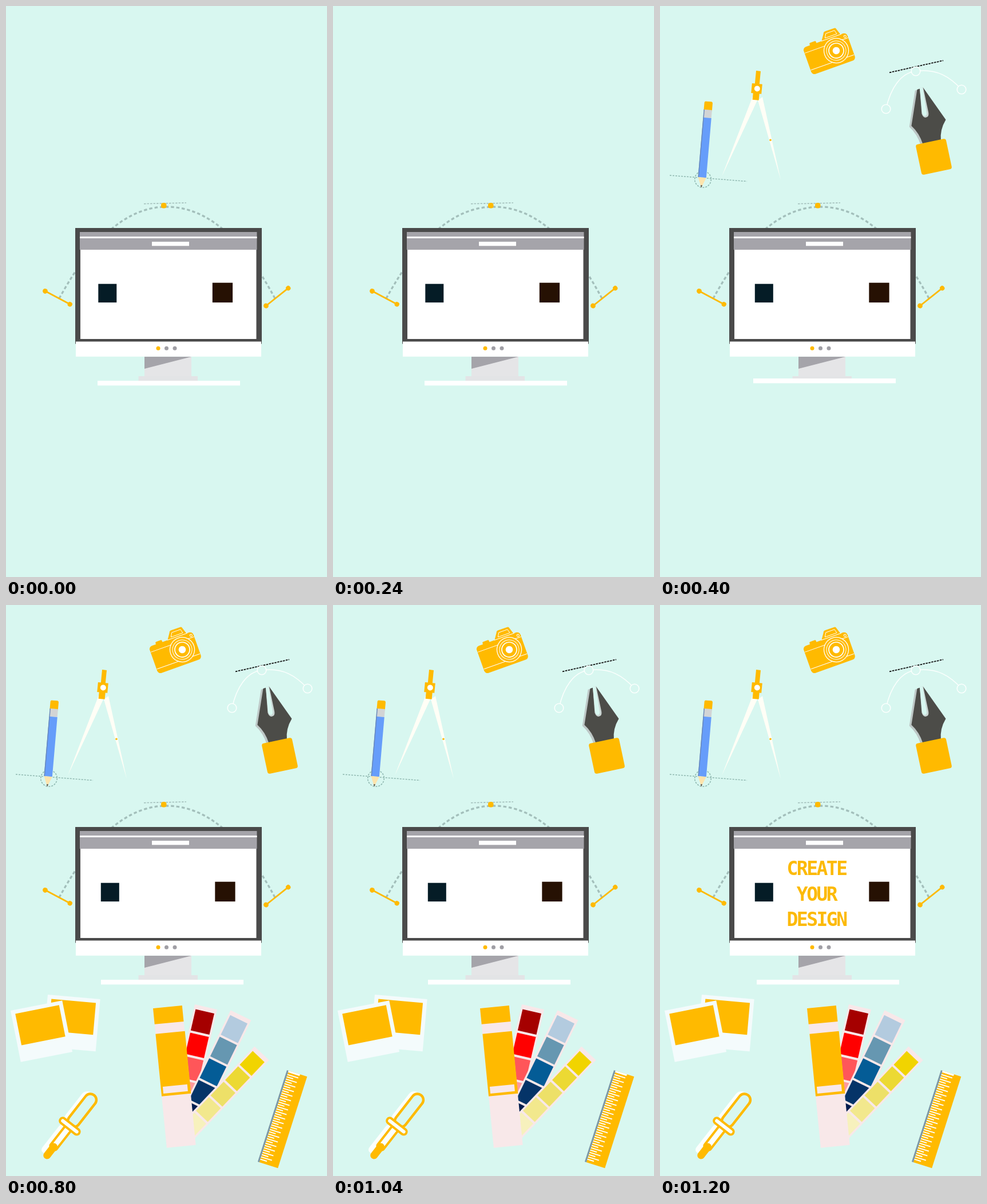
These frames come from a looping animation (561 px wide and 998 px high, 1.6 s). An HTML page with a canvas:

```html
<!DOCTYPE html>
<html lang="en">
<head>
<meta charset="utf-8">
<title>Design desk</title>
<style>
html, body { margin: 0; width: 100%; height: 100%; overflow: hidden; background: #d8f7f0; }
canvas { display: block; width: 100vw; height: 100vh; }
</style>
</head>
<body>
<canvas id="stage" width="561" height="998"></canvas>
<script>
const ctx = document.getElementById("stage").getContext("2d");
const MINT = "#d8f7f0", GOLD = "#ffba00", GREY = "#a5a4aa", DARK = "#4c4c48";
const SAGE = "#a3bfbb", WHITE = "#fff", BLUSH = "#f8e8e9";
const STEP = 400;

function rect(x, y, w, h, color) {
  ctx.fillStyle = color;
  ctx.fillRect(x, y, w, h);
}

function shape(path, color) {
  ctx.fillStyle = color;
  ctx.fill(new Path2D(path));
}

function line(path, color, width, dash = []) {
  ctx.strokeStyle = color;
  ctx.lineWidth = width;
  ctx.setLineDash(dash);
  ctx.stroke(new Path2D(path));
  ctx.setLineDash([]);
}

function circle(x, y, r, fill, stroke, width = 1, dash = []) {
  ctx.beginPath();
  ctx.arc(x, y, r, 0, Math.PI * 2);
  if (fill) { ctx.fillStyle = fill; ctx.fill(); }
  if (stroke) {
    ctx.strokeStyle = stroke;
    ctx.lineWidth = width;
    ctx.setLineDash(dash);
    ctx.stroke();
    ctx.setLineDash([]);
  }
}

function pill(x, y, w, h, r, fill, stroke, width) {
  ctx.beginPath();
  ctx.roundRect(x, y, w, h, r);
  if (fill) { ctx.fillStyle = fill; ctx.fill(); }
  if (stroke) { ctx.strokeStyle = stroke; ctx.lineWidth = width; ctx.stroke(); }
}

function placed(x, y, degrees, draw) {
  ctx.save();
  ctx.translate(x, y);
  ctx.rotate(degrees * Math.PI / 180);
  draw();
  ctx.restore();
}

function handle(x, y, degrees, length) {
  placed(x, y, degrees, () => {
    rect(0, -1.4, length, 2.8, GOLD);
    circle(0, 0, 4.4, GOLD);
    circle(length, 0, 4.1, GOLD);
  });
}

function guides() {
  line("M93 511C130 445 190 351 281 351C370 351 432 440 470 511", SAGE, 3.3, [5.5, 4]);
  line("M241 345.7L315 344", SAGE, 1.6, [3.5, 2]);
  pill(271, 344, 9.5, 9.5, 4, GOLD);
  handle(68.5, 498.3, 28, 49);
  handle(454.5, 524, -38.5, 49.5);
}

function monitor(step) {
  rect(242, 613, 82, 35, "#e5e5e7");
  shape("M242 613H324L242 634Z", GREY);
  rect(231.5, 647, 103.5, 8, "#e3e4e6");
  // The base plate slides right and lifts briefly.
  rect(160 + step * 3, step === 1 ? 651 : 655, 249, 8.3, WHITE);

  rect(121, 388, 326, 202.5, "#4a4a4a");
  rect(129, 395, 309.5, 31, GREY);
  rect(129, 403, 309.5, 3, WHITE);
  rect(255, 412, 65, 7.3, WHITE);
  rect(130, 426, 307.5, 156, WHITE);
  rect(122, 586.5, 324, 26.3, WHITE);
  for (let i = 0; i < 3; i++) circle(266 + i * 14.5, 598.3, 3.5, i ? "#a09fa5" : GOLD);

  const shift = step ? 4.5 : 0;
  rect(161.3 + shift, 485.7, 32, 32.5, "#051c26");
  rect(360.8 + shift, 483.7, 35.3, 34.5, "#261103");
}

function camera() {
  placed(296.5, 85, -19.6, () => {
    pill(-27, -31, 12, 8, 2, GOLD);
    shape("M-6 -26L2 -38Q3 -41 6 -41H23Q26 -41 26 -38L30 -26Z", GOLD);
    line("M2 -30L6 -37H22L24 -30Z", WHITE, 0.9);
    pill(-40.5, -27, 81, 50.5, 6, GOLD);
    line("M-40 -17H40M-40 14.5H40M-6 -27H31", WHITE, 1);
    circle(36, -21, 2, GOLD, WHITE);
    placed(13.2, -2.7, 0, () => {
      circle(0, 0, 21.5, GOLD, WHITE, 1.3);
      circle(0, 0, 17, null, WHITE);
      circle(0, 0, 13, null, WHITE, 1.7);
      circle(0, 0, 6.3, WHITE);
    });
  });
}

function compass() {
  shape("M162 158L170 165L108 298ZM171 165L179 159L211 304Z", "#fffef6");
  placed(172, 113.5, 5.5, () => {
    rect(-4, 0, 8, 50, GOLD);
    rect(-9, 22.5, 18, 17, GOLD);
    rect(-5.5, 38, 11, 13, GOLD);
    circle(0.8, 31, 5, WHITE);
  });
  circle(193, 234.3, 1.8, GOLD);
}

function pencil() {
  line("M17 296L152 306.5", "#8fb8b0", 1.5, [3, 2]);
  circle(75, 303, 14.3, null, "#8fb8b0", 1.6, [3, 2]);
  placed(85, 167, 4.9, () => {
    pill(-7.2, 0, 14.4, 18, 3, GOLD);
    rect(-7.2, 14.5, 14.4, 14, "#d2d4d5");
    rect(-7.2, 28.5, 14.4, 104.5, "#669dfa");
    rect(-7.2, 14.5, 1.4, 118.5, "#6887b8");
    shape("M-7.2 133H7.2L0 151Z", "#fce4ad");
    shape("M-1.6 147H1.6L0 151Z", DARK);
  });
}

function knot(x, y) {
  circle(x, y, 7.8, MINT, "#fbfffd", 1.6);
}

function pen() {
  line("M401 116.3L495 95.3", "#111", 1.8, [3.5, 1.5]);
  line("M395 180C403 143 421 117 447 114C484 109 507 124 527 146", "#fbfffd", 1.6);
  knot(395, 180);
  knot(447, 114);
  knot(527, 146);

  placed(478.5, 263.5, -12, () => {
    const nib = "M-4 -121L-27 -61Q-16 -46 -14 -25H18Q20 -44 34 -59L7 -122Z";
    placed(-4, 1, 0, () => shape(nib, "#bdc7c6"));
    shape(nib, DARK);
    shape("M1 -123L-5 -78Q-4 -70 1 -70Q7 -70 7 -78V-123Z", "#cad5d3");
    shape("M1 -123L-4 -80Q-4 -73 0 -73Q4 -73 4 -80L6 -123Z", MINT);
    pill(-27, -27, 54, 54, 4, GOLD);
  });
}

function photo(x, y, degrees) {
  placed(x, y, degrees, () => {
    rect(0, 0, 92, 91.5, "#f4fbfc");
    rect(7, 7, 78, 56, GOLD);
  });
}

function photos() {
  photo(73, 681, 5);
  photo(8, 709, -11.2);
}

function swatches(x, y, degrees, width, pitch, colors) {
  placed(x, y, degrees, () => {
    rect(-width / 2, 0, width, pitch * colors.length + 15, BLUSH);
    colors.forEach((c, i) => rect(3.3 - width / 2, 8 + i * pitch, width - 6.6, pitch - 4, c));
  });
}

function palette() {
  swatches(349.5, 702.5, 13, 40, 42, ["#a50000", "#ff0000", "#ff5659", "#ff999b"]);
  swatches(410.5, 717, 26, 40, 42, ["#b3cbdf", "#6697b1", "#045c96", "#053468", "#001d4f"]);
  swatches(447, 783.5, 43.5, 35, 37, ["#f1d400", "#ecd933", "#ede068", "#f2e88d", "#f7f1bd"]);
  placed(257, 705, -5.6, () => {
    rect(0, 0, 51, 245, BLUSH);
    rect(0, 0, 51, 28, GOLD);
    rect(0, 45, 51.5, 109.5, GOLD);
    rect(3.5, 138, 43, 12, BLUSH);
  });
}

function dropper() {
  const white = "#fbfffd";
  placed(149, 863, 38, () => {
    pill(-18, -8, 22, 68, 11, white);
    pill(-15, 66, 14, 60, 6, white);
    pill(-10.5, -8, 21, 68, 10.5, MINT, GOLD, 4.4);
    pill(-6.5, 64, 13, 46, 3, white, GOLD, 4);
    pill(-6.5, 100, 13, 32, 6.5, GOLD);
    pill(-20.5, 56, 41, 10, 5, white, GOLD, 4);
  });
}

function ruler() {
  placed(491, 813, 17.7, () => {
    rect(3, 0, 34, 168, GOLD);
    rect(0, 0, 3, 168, "#7c97a5");
    rect(3, 0, 21, 3, WHITE);
    for (let i = 0; i < 38; i++) rect(3, 6 + i * 4.2, i % 2 ? 12 : 20, 1.9, WHITE);
  });
}

function slogan() {
  ctx.font = 'bold 33px "DejaVu Sans Mono", monospace';
  ctx.letterSpacing = "-2.5px";
  ctx.textAlign = "center";
  ctx.fillStyle = "#fcba08";
  ["CREATE", "YOUR", "DESIGN"].forEach((text, i) => ctx.fillText(text, 273.5, 472 + i * 44.5));
}

// Each step adds one group to everything before it.
const groups = [[guides, monitor], [camera, compass, pencil, pen], [photos, palette, dropper, ruler], [slogan]];

function draw(time) {
  const step = Math.floor(time / STEP) % groups.length;
  rect(0, 0, 561, 998, MINT);
  groups.slice(0, step + 1).flat().forEach(part => part(step));
}

const start = performance.now();
function tick() {
  draw(performance.now() - start);
  requestAnimationFrame(tick);
}
tick();
</script>
</body>
</html>
```
